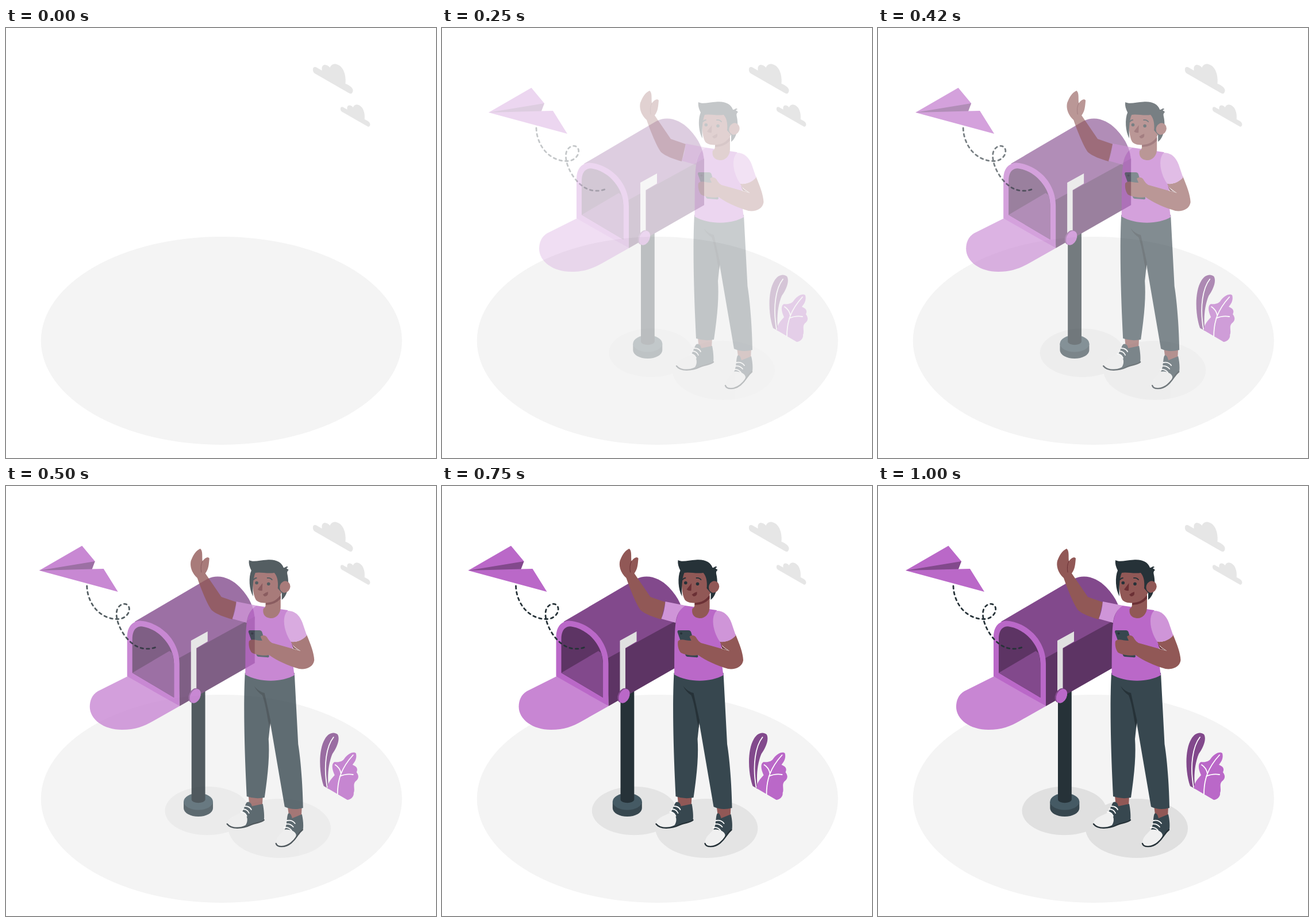
These frames come from a looping animation (748x748 px, 1.04 s). An HTML page:

```html
<!DOCTYPE html>
<html lang="en">
<head>
<meta charset="utf-8">
<title>Mailbox</title>
<style>
  html, body { margin: 0; width: 100%; height: 100%; overflow: hidden; background: #fff; }
  svg { display: block; width: 748px; height: 748px; }
  .main { fill: #ba68c8; }
  .deep { fill: #82498c; }
  .deepest { fill: #5d3464; }
  .lid { fill: #c886d3; }
  .sleeve { fill: #cf95d8; }
  .ink { fill: #263238; }
  .slate { fill: #37474f; }
  .skin { fill: #915856; }
  .blush { fill: #6b3035; }
  .pale { fill: #e0e0e0; }
  .cap { fill: #f0f0f0; }
  .line { fill: none; stroke: #fff; stroke-width: 1.8; stroke-linecap: round; }
  .dark { stroke: #263238; }
</style>
</head>
<body>
<svg viewBox="0 0 748 748">
  <ellipse cx="374.8" cy="544" rx="314" ry="181" fill="#f4f4f4"/>
  <g fill="#e6e6e6">
    <path id="cloud" d="M536 68C533 69 533 76 537 79L597 113.500C601 116 604 112 603.500 108C603 103 596 99 590.500 97C592 84 588 65 573 62.500C567 62 564 67 563.500 69C560 64 551 61 549.500 69V74L540 68.500Q538 67.500 536 68Z"/>
    <use href="#cloud" transform="translate(186.800 87.100) scale(.74)"/>
  </g>

  <g class="slow pale">
    <ellipse cx="324" cy="565" rx="73.500" ry="42.300"/>
    <ellipse cx="450" cy="595.500" rx="89" ry="51.500"/>
  </g>

  <!-- mailbox -->
  <g class="quick">
    <path class="slate" d="M299.300 549V560.500A25.500 14.500 0 0 0 350.300 560.500V549Z"/>
    <ellipse cx="324.8" cy="549" rx="25.500" ry="14.500" fill="#455a64"/>
    <path class="ink" d="M313 350H336.800V546A12 6 0 0 1 313 546Z"/>
    <path class="deep" d="M214 236L340 162C360 152 381 160 397 176C415 195 422 212 423 232L292 310Z"/>
    <path class="deepest" d="M290 300L423 227V308L292 383Z"/>
    <path class="lid" d="M203 330.500L150 357C140 363 136 373 136 384C136 406 160 424 192 424C215 424 230 418 246 409L292 383Z"/>
    <path class="main" d="M201 331V262C201 242 214 232 229 235C262 240 292 270 292 309V383Z"/>
    <path class="deepest" d="M210 325V266C210 249 219 242 230 245C257 250 282.500 278 282.500 309V368Z"/>
    <path class="deep" d="M210 325L274.500 287L280 291L282.500 309V368Z"/>
    <path class="pale" d="M312 269L341 253V270.500L321.500 282V357L312 362Z"/>
    <ellipse class="deep" cx="317.500" cy="364.500" rx="9" ry="13.300" transform="rotate(25 317.500 364.500)"/>
    <ellipse class="main" cx="319.500" cy="365.300" rx="8.800" ry="13" transform="rotate(25 319.500 365.300)"/>
  </g>

  <!-- paper plane -->
  <g class="quick">
    <path class="main" d="M48 147L122.500 104L145 131L139.500 144.500L160 144L185 184Z"/>
    <path class="deep" d="M48 147L145 131L140 144.500Z"/>
    <path class="line dark" style="stroke-width:2.800" stroke-dasharray="4.500 6" d="M131 174C132 205 154 232 185 231.500C198 231 206 221 204.500 212C202 202 189 203 184 214C177 231 195 268 218 279C232 286 246 283 254.500 279"/>
  </g>

  <!-- plant -->
  <g class="quick">
    <path class="deep" d="M543 522C535 500 533 460 545 440C551 429 561 427 567 432C572 440 566 455 558 466C550 485 549 510 552 527Z"/>
    <path class="main" d="M550 526C550 515 556 510 562 503C557 492 556 483 562 480C570 481 576 479 579 474C585 466 594 461 599 465C601 473 598 479 593 485C600 488 603 491 600 498C604 503 605 509 598 514C593 520 598 527 595 534C596 540 590 546 584 546Z"/>
    <path class="line" d="M560 437C548 452 542 485 549 524M567 536C567 510 574 490 594 468M571 505Q582 500 594 502M563 485Q571 490 573 500"/>
  </g>

  <!-- person -->
  <g class="quick">
    <path class="skin" d="M412 538H437L436 558L414 560ZM480 556H505L504 577L483 579Z"/>
    <path class="slate" d="M408 552C411 547 417 550 418 557L437 553C439 563 440 575 439 581C430 587 424 586 419 588C410 592 402 595 390 595L403 563Z"/>
    <path class="cap" d="M375 584C380 575 394 572 402 567C411 572 412 583 407 590C398 595 378 597 375 584Z"/>
    <path class="line dark" style="stroke-width:2.400" d="M375 588C382 597 400 597 417 589C426 585 434 586 439 581"/>
    <path class="line" d="M406 557Q414 557 417 563M402 562Q410 562 413 569M399 567Q406 567 409 574"/>
    <path class="slate" d="M481 570C484 567 487 573 488 578L505 571C507 579 508 590 507 597C503 603 498 605 495 612L474 600C480 590 478 576 481 570Z"/>
    <path class="cap" d="M460 620C460 610 470 604 474 598C482 596 494 600 495 607C494 618 480 628 468 626C463 626 460 624 460 620Z"/>
    <path class="line dark" style="stroke-width:2.400" d="M460 622C462 629 476 629 486 621C497 612 497 605 506 598"/>
    <path class="line" d="M479 582Q488 580 493 587M477 588Q485 587 490 593M474 594Q482 593 487 599"/>
    <path class="slate" d="M406 325C403 380 405 460 409 540Q424 545 440 542C446 500 449 470 447 440L450 412L475 558Q490 565 507 560C506 510 502 470 498.500 449L492 325Z"/>
    <path class="ink" d="M422 348Q430 358 440 360L450.500 408L449 421L446 408Q441 376 436 364Q427 358 422 348Z"/>

    <path class="skin" d="M328 109C333 112 331 122 332 131C336 125 342 122 344 126C343 136 343 144 337 152L365 193L391 202L384 232C370 228 356 223 348 216C340 205 330 180 323 160C312 150 310 138 312 130C316 120 320 113 328 109Z"/>
    <path class="line" style="stroke:#6b3035;stroke-width:1" d="M332 131Q328 138 330 150"/>
    <path class="main" d="M425 208L480 216C488 225 497 260 489 280C488 300 490 315 492 329C470 342 430 342 406.500 328C407 300 406 260 409 238C411 225 417 212 425 208Z"/>
    <path class="sleeve" d="M391 201L426 208C416 214 410 225 409 238L384 231C388 222 390 212 391 201Z"/>

    <path class="slate" d="M414 251H431Q435 251 436 255L448 296Q448 299 444 298L430 297Q427 297 426 294L412 254Q412 251 414 251Z"/>
    <circle class="ink" cx="418.500" cy="256.500" r="2"/>
    <path class="skin" d="M486 271C496 272 507 268 513 258C520 275 526 290 526.500 303C525 315 512 320 500 318C480 312 462 304 448 294C440 296 425 294 418 290C413 285 412 275 413 270C418 264 428 270 436 269L433 262C437 258 443 259 446 266Q449 271 453 273L503 287C493 281 488 277 486 271Z"/>
    <path class="blush" d="M487 274Q492 284 505 287L490 283Z"/>
    <path class="sleeve" d="M480 217C493 217 501 225 506 238L513.500 260C507 268 496 272 486 271C476 258 468 230 480 217Z"/>

    <path class="skin" d="M442 190L468 186V211C468 222 460 231 450 230C440 229 436 222 438 213Q442 212 442 205Z"/>
    <path class="blush" d="M442 202Q458 201 468 190V196Q458 207 442 207Z"/>
    <path class="skin" d="M420 149C418 170 420 190 425 198C430 205 448 205 458 199C466 194 470 186 472 180V150Z"/>
    <path class="ink" d="M413 129C420 133 432 129 444 128.500C460 127 470 133 473 142C476 143 478 138 481 141L478 143L482 146C479 149 479 150 480 155C483 170 481 190 470 198V186L463 178C464 168 463 158 457 151C445 153 432 149 424 151C420 160 419 178 420 192C413 180 412 158 417 147C414 141 412 135 413 129Z"/>
    <ellipse class="skin" cx="475.500" cy="175.500" rx="9" ry="10.300" transform="rotate(20 475.500 175.500)"/>
    <circle class="ink" cx="426.300" cy="168.500" r="2.800"/>
    <circle class="ink" cx="447" cy="170.300" r="2.800"/>
    <path class="line dark" d="M421 163Q423 160 426 160M445 160Q450 159 453 163"/>
    <path class="blush" d="M436.500 169L428 180Q432 183 436 182ZM437 189Q442 185 446 184Q447 192 440 192Z"/>
  </g>
</svg>
<script>
  const LOOP = 1040, FPS = 24, SHIFT = 44.9;
  const bezier = (a, b, s) => 3 * (1 - s) * s * ((1 - s) * a + s * b) + s ** 3;

  // cubic-bezier(.36, -.01, .5, 1.38), solved by bisection
  function ease(t) {
    if (t >= 1) return 1;
    let lo = 0, hi = 1;
    for (let i = 0; i < 24; i++) {
      const mid = (lo + hi) / 2;
      if (bezier(.36, .5, mid) < t) lo = mid; else hi = mid;
    }
    return bezier(-.01, 1.38, lo);
  }

  function place(selector, y) {
    for (const g of document.querySelectorAll(selector)) {
      g.setAttribute("transform", `translate(${SHIFT * (1 - y)} 0)`);
      g.setAttribute("opacity", Math.min(1, Math.max(0, y)));
    }
  }

  function draw(now) {
    const step = Math.floor((now % LOOP + 5) * FPS / 1000);
    const t = step < 2 ? 0 : (step + .5) / FPS;
    place(".quick", ease(t));
    place(".slow", ease(t / 1.5));
  }

  const start = performance.now();
  function tick() {
    draw(performance.now() - start);
    requestAnimationFrame(tick);
  }
  tick();
</script>
</body>
</html>
```
